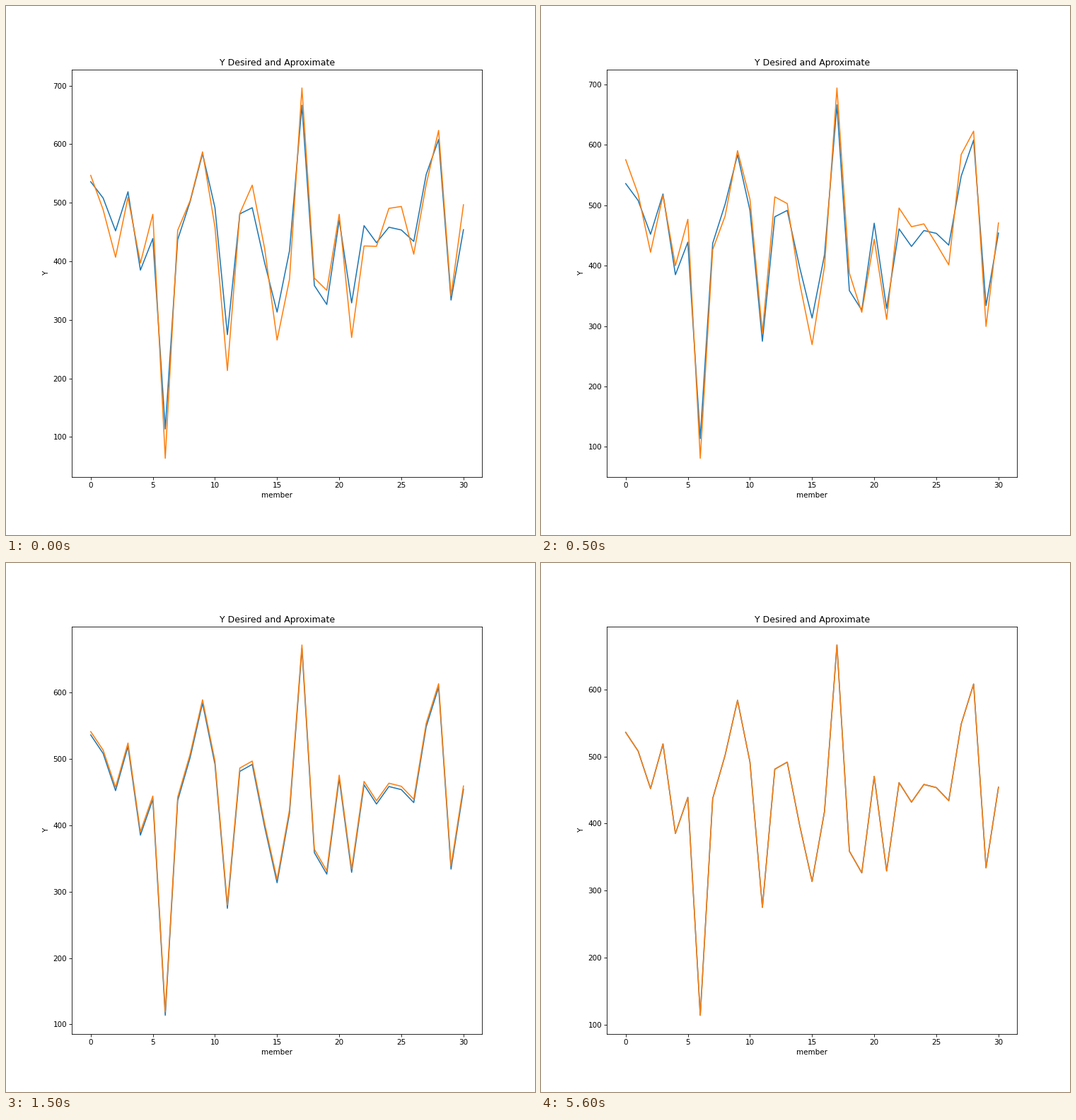
Animation, 748 px wide and 748 px high, one loop 8000 ms. Source, as a matplotlib script:

```python
import numpy as np
import matplotlib.pyplot as plt
from matplotlib.animation import FuncAnimation

STEP_MS = 500
STEPS = 16

desired = np.array([
    535.9, 508, 452, 518.7, 385, 438.9, 113.7, 437, 501.8, 583.8, 491.6,
    274.8, 481, 491.5, 397.3, 313.3, 418, 666.3, 358.7, 326.3, 470.3,
    329, 460.9, 431.8, 458.2, 453.5, 434, 548.2, 608, 333.8, 454])
members = np.arange(len(desired))
low, high = desired.min(), desired.max()
middle = (low + high) / 2
# Wobble fades out towards the two extreme members.
freedom = 1 - ((desired - middle) / (high - middle)) ** 2


def wobble(turns):
    """Wave from -1 to 1 whose alternating peaks and troughs sit at turns."""
    return np.cos(np.pi * np.interp(members, turns, np.arange(len(turns))))


def fit(gain=0, bias=0, size=0, turns=(0, 1)):
    stretch = gain * (desired - middle)
    return desired + stretch + bias + size * freedom * wobble(turns)


# The approximation closes in on the desired curve step by step.
fits = [
    fit(0.144, -10.2, 46,
        [-2, 2, 5, 10.6, 13.5, 15.6, 19, 21.3, 24.8, 26.7, 30]),
    fit(0.11, -2.4, 36,
        [0, 2, 5, 8.2, 11.2, 15, 18.2, 20, 22.4, 26, 27.2, 28.4, 31]),
    fit(0.014, -4.6, 28, [0.5, 2, 5, 8.5, 11, 14.5, 21, 25, 29.2, 32]),
    fit(bias=5),
    fit(),
]

fig, ax = plt.subplots(figsize=(10, 10), dpi=74.8)
fig.subplots_adjust(left=0.1249)
ax.set(title="Y Desired and Aproximate", xlabel="member", ylabel="Y")
ax.plot(members, desired, color="C0")
fit_line, = ax.plot(members, fits[0], color="C1")


def draw(i):
    fit_line.set_ydata(fits[min(i, len(fits) - 1)])
    ax.relim()
    ax.autoscale_view()
    return fit_line,


anim = FuncAnimation(fig, draw, frames=STEPS, interval=STEP_MS,
                     repeat=True, repeat_delay=0, blit=False)
plt.show()
```
